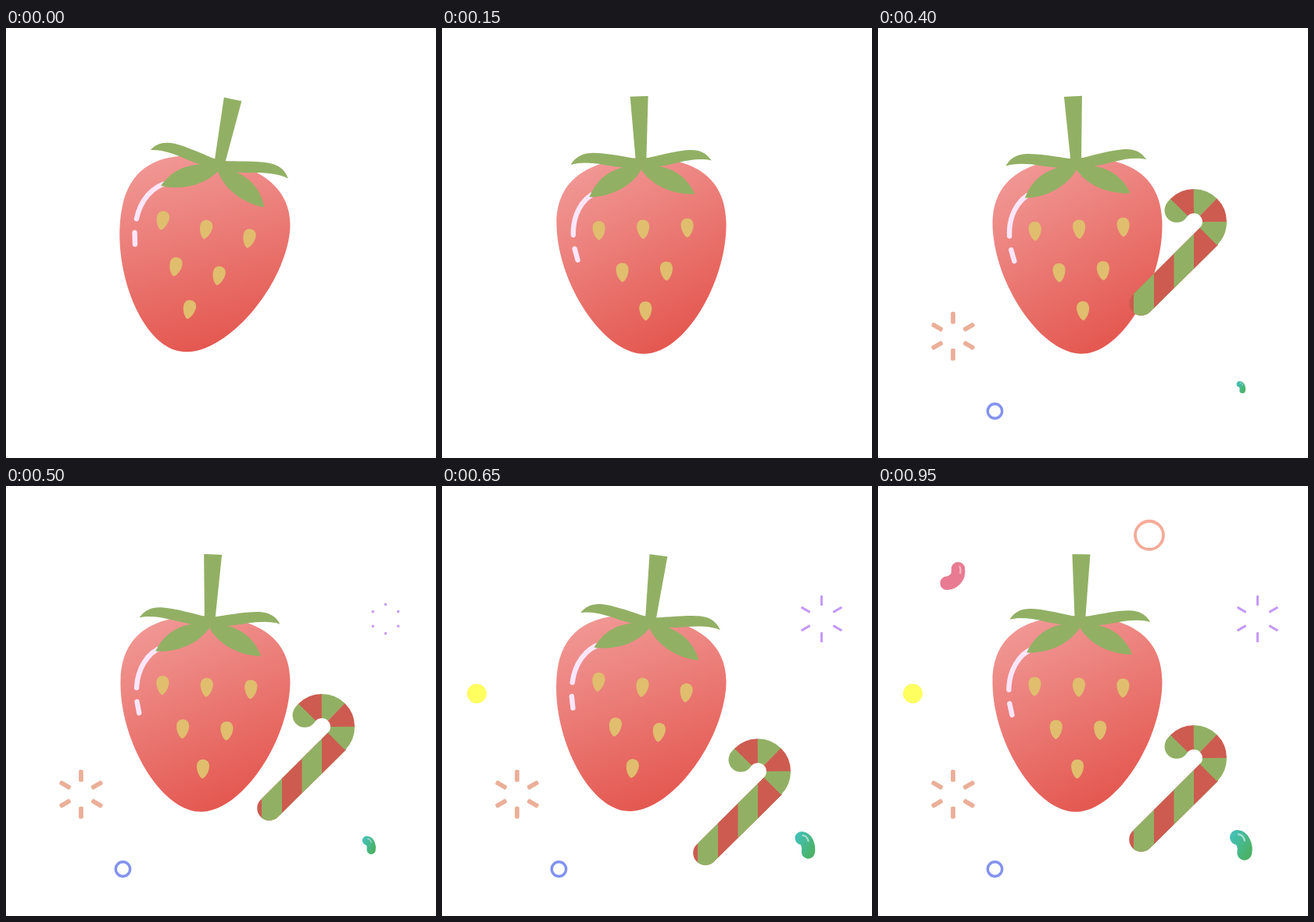
Write an HTML page that moves like this. It is 550 px wide and 550 px high and loops after 1 s.

```html
<!DOCTYPE html>
<html lang="en">
<head>
<meta charset="utf-8">
<title>Strawberry</title>
<style>
  html, body { margin: 0; width: 100%; height: 100%; overflow: hidden; background: #fff; }
  svg { display: block; width: 100vw; height: 100vh; }
</style>
</head>
<body>
<svg viewBox="0 0 550 550">
  <defs>
    <linearGradient id="flesh" gradientUnits="userSpaceOnUse" x1="-60" y1="-93" x2="58" y2="149">
      <stop offset="0" stop-color="#f19996"/>
      <stop offset="1" stop-color="#e3554d"/>
    </linearGradient>
    <linearGradient id="mint" gradientUnits="userSpaceOnUse" x1="-13" y1="-6" x2="12" y2="6">
      <stop offset="0" stop-color="#43bfb2"/>
      <stop offset="1" stop-color="#4bb266"/>
    </linearGradient>
    <clipPath id="shaft">
      <path d="M413 354.5 L325 442 A15.6 15.6 0 0 0 347 464 L435 377 Z"/>
    </clipPath>
    <path id="seed" fill="#e0be6e" d="M0 -12 C5 -12 8 -8.5 8 -3.5 C8 3 4 11 0 12.5 C-4 11 -8 3 -8 -3.5 C-8 -8.5 -5 -12 0 -12 Z"/>
    <g id="leaves" fill="#92b064">
      <path d="M0 -89 L7 -90.5 C32 -95.5 50 -99.3 63 -99.3 C75 -99.3 84 -95 90 -85 C78 -88.5 62 -87 46 -83.5 C35 -81 20 -79 0 -77 Z"/>
      <path d="M0 -82 C28 -82 54 -74 67.5 -43 C45 -42 15 -52 0 -76 Z"/>
    </g>
  </defs>

  <g id="berry">
    <path fill="url(#flesh)" d="M-110.5 -7 C-110.5 -65 -69 -91 -2 -91 C65 -91 106.5 -65 106.5 -7 C106.5 68 50 159.5 -2 159.5 C-54 159.5 -110.5 68 -110.5 -7 Z"/>
    <path fill="none" stroke="#fbe6fb" stroke-width="6.4" stroke-linecap="round" d="M-89.5 4.8 C-89.5 -18 -79 -41 -58 -49 M-88.2 22.5 L-84.8 37"/>
    <g id="seeds"></g>
    <use href="#leaves"/>
    <use href="#leaves" transform="scale(-1 1)"/>
    <path fill="#92b064" d="M-11.4 -170 H11.6 L6.6 -84 H-6.6 Z"/>
  </g>

  <g id="cane"></g>
  <g id="orange"></g>
  <g id="purple"></g>

  <g id="mintBean" fill="none" stroke-linecap="round">
    <path stroke="url(#mint)" stroke-width="19" d="M-5 -10 C2 -9.5 6 1 4.3 9.7"/>
    <path stroke="#a6ded2" stroke-width="2.4" d="M-3.5 -14 C1 -13.5 3.5 -10 4.5 -6"/>
  </g>
  <g id="pinkBean" fill="none" stroke-linecap="round">
    <path stroke="#e87a92" stroke-width="19.5" d="M7.7 -10 C9.5 2 1 10 -8.2 10.3"/>
    <path stroke="#f6b9c6" stroke-width="2.4" d="M10 -13 C11.6 -10 11.6 -7 10.8 -4"/>
  </g>

  <circle id="blueRing" cx="149.5" cy="490" r="9.2" fill="none" stroke="#8292ee" stroke-width="3.4"/>
  <circle id="sun" cx="44.5" cy="265.5" r="12.5" fill="#ffff60"/>
  <circle id="pinkRing" cx="347" cy="63" r="18" fill="none" stroke="#f5ab98" stroke-width="3.8"/>
</svg>

<script>
const LOOP = 1000, STEP = 50;
const GREEN = '#92b064', RED = '#cd5b50';
const $ = id => document.getElementById(id);

function add(parent, tag, attrs) {
  const el = document.createElementNS('http://www.w3.org/2000/svg', tag);
  for (const k in attrs) el.setAttribute(k, attrs[k]);
  parent.appendChild(el);
  return el;
}

// Piecewise linear value through [time, value] keys, held outside them
function track(keys, t) {
  if (t <= keys[0][0]) return keys[0][1];
  for (let i = 1; i < keys.length; i++) {
    const [t0, a] = keys[i - 1], [t1, b] = keys[i];
    if (t < t1) return a + (b - a) * (t - t0) / (t1 - t0);
  }
  return keys[keys.length - 1][1];
}

function show(id, on) {
  $(id).setAttribute('visibility', on ? 'visible' : 'hidden');
}

function buildSeeds() {
  for (const [y, xs] of [[0, [-56.5, 0, 56.5]], [54.5, [-28.2, 28.2]], [104.5, [0]]])
    for (const x of xs) add($('seeds'), 'use', { href: '#seed', x, y });
}

function buildCane() {
  const cane = $('cane'), cx = 404, cy = 348, r = 26.5, width = 31;
  const at = deg => {
    const a = deg * Math.PI / 180;
    return [cx + r * Math.cos(a), cy + r * Math.sin(a)];
  };
  const shaft = add(cane, 'g', { 'clip-path': 'url(#shaft)' });
  [300, 327, 353, 378.5, 404].forEach((x, i) =>
    add(shaft, 'rect', { x, y: 340, width: 140, height: 140, fill: i % 2 ? GREEN : RED }));
  const [tx, ty] = at(214);
  add(cane, 'circle', { cx: tx, cy: ty, r: width / 2, fill: GREEN });
  // Each stripe starts a little early to hide the seam
  for (const [from, to, color] of [[214, 225, GREEN], [225, 270, RED], [270, 315, GREEN], [315, 360, RED], [0, 45, GREEN]])
    add(cane, 'path', {
      d: `M${at(from - 0.5)} A${r} ${r} 0 0 1 ${at(to)}`,
      fill: 'none', stroke: color, 'stroke-width': width
    });
}

// Six rays growing outwards from an inner radius
function burst(id, x, y, inner, width, rx, fill) {
  const rays = [];
  for (let i = 0; i < 6; i++)
    rays.push(add($(id), 'rect', {
      x: -width / 2, width, rx, fill,
      transform: `translate(${x} ${y}) rotate(${i * 60})`
    }));
  return len => {
    show(id, len > 0);
    for (const ray of rays) {
      ray.setAttribute('y', -inner - len);
      ray.setAttribute('height', len);
    }
  };
}

function bean(id, x, y, start, t) {
  show(id, t >= start);
  const s = track([[start, 0.4], [start + 300, 1]], t);
  $(id).setAttribute('transform', `translate(${x} ${y}) scale(${s})`);
}

buildSeeds();
buildCane();
const growOrange = burst('orange', 96, 394.3, 15.7, 5.8, 1.8, '#ebaf98');
const growPurple = burst('purple', 485.5, 170, 17, 3, 0.8, '#c59af6');

function draw(t) {
  // The berry swings about the middle of its body
  const angle = track([[0, 11.7], [250, -10.7], [600, 8], [1000, 0]], t);
  $('berry').setAttribute('transform', `translate(257 257.3) rotate(${angle} -2 -7)`);

  show('cane', t >= 400);
  const drop = track([[400, -100], [600, 20], [1000, -2.8]], t);
  $('cane').setAttribute('transform', `translate(0 ${drop})`);

  growOrange(track([[200, 0], [360, 15.5]], t));
  growPurple(track([[465, 0], [600, 13]], t));
  bean('mintBean', 464.5, 459.5, 400, t);
  bean('pinkBean', 95.5, 115, 700, t);
  show('blueRing', t >= 400);
  show('sun', t >= 550);
  show('pinkRing', t >= 700);
}

const begin = performance.now();
function tick() {
  const t = (performance.now() - begin) % LOOP;
  draw(Math.floor(t / STEP) * STEP);
  requestAnimationFrame(tick);
}
tick();
</script>
</body>
</html>
```
